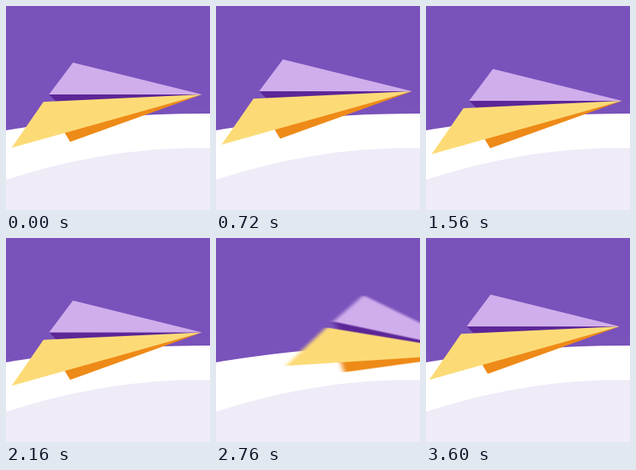
Write an HTML page that moves like this. It is 256 by 256 pixels and loops after 3.66 s.

```html
<!DOCTYPE html>
<html lang="en">
<head>
<meta charset="utf-8">
<title>Paper plane</title>
<style>
  html, body { margin: 0; width: 100%; height: 100%; overflow: hidden; background: #7a52bb; }
  svg { display: block; width: 100vw; height: 100vh; }
</style>
</head>
<body>
<svg viewBox="0 0 256 256">
  <defs>
    <filter id="blur" filterUnits="userSpaceOnUse" x="-60" y="0" width="376" height="256" color-interpolation-filters="sRGB">
      <feGaussianBlur id="smear" stdDeviation="0 0"/>
    </filter>
  </defs>
  <rect width="256" height="256" fill="#7a52bb"/>
  <path d="M0 156Q128 134.5 256 135V256H0Z" fill="#fff"/>
  <path d="M0 218Q128 176 256 178V256H0Z" fill="#efebf7"/>
  <g id="sky">
    <!-- drawn around the plane's pivot -->
    <g id="plane">
      <path d="M-72-10.3H119.5L-60 2Z" fill="#5c2697"/>
      <path d="M-42-50L120-10L-72-10Z" fill="#d0aeec"/>
      <path d="M-53 37L-45.5 49.5L120-10Z" fill="#ee8a17"/>
      <path d="M-79-.8L120-10L-119 57Z" fill="#fcdb77"/>
    </g>
  </g>
</svg>
<script>
const LOOP = 3660, STEP = 60;
const PIVOT = { x: 126, y: 121 };
const EXIT = { start: 2566, time: 569, reach: 344 };
const ENTER = 3200;

const sky = document.getElementById('sky');
const plane = document.getElementById('plane');
const smear = document.getElementById('smear');

// Sine ease from a to b between times t0 and t1
function ease(t, t0, t1, a, b) {
  const u = Math.min(1, Math.max(0, (t - t0) / (t1 - t0)));
  return a + (b - a) * (1 - Math.cos(Math.PI * u)) / 2;
}

function shiftX(t) {
  if (t >= ENTER) return -3 * Math.pow(Math.max(0, LOOP - t) / STEP, 2.65);
  return ease(t, EXIT.start, EXIT.start + EXIT.time, 0, EXIT.reach);
}

function shiftY(t) {
  if (t >= ENTER) return 0;
  if (t < 660) return ease(t, 0, 660, 0, -4);
  if (t < 1800) return ease(t, 660, 1800, -4, 9.5);
  const dive = Math.max(0, t - 2600) / 160;
  return ease(t, 1800, 2600, 9.5, 5) + 3.5 * dive * dive;
}

function tilt(t) {
  return t >= ENTER ? 0 : ease(t, 2560, 2760, 0, 12);
}

function draw(t) {
  const x = PIVOT.x + shiftX(t);
  const y = PIVOT.y + shiftY(t);
  plane.setAttribute('transform', `translate(${x} ${y}) rotate(${tilt(t)})`);

  const speed = Math.abs(shiftX(t + 5) - shiftX(t - 5)) * STEP / 10;
  const blur = Math.min(4, speed * 0.06);
  if (blur > 0.1) {
    smear.setAttribute('stdDeviation', `${blur} 0`);
    sky.setAttribute('filter', 'url(#blur)');
  } else {
    sky.removeAttribute('filter');
  }
}

function tick() {
  const t = performance.now() % LOOP;
  draw(Math.floor(t / STEP) * STEP);
  requestAnimationFrame(tick);
}

draw(0);
requestAnimationFrame(tick);
</script>
</body>
</html>
```
